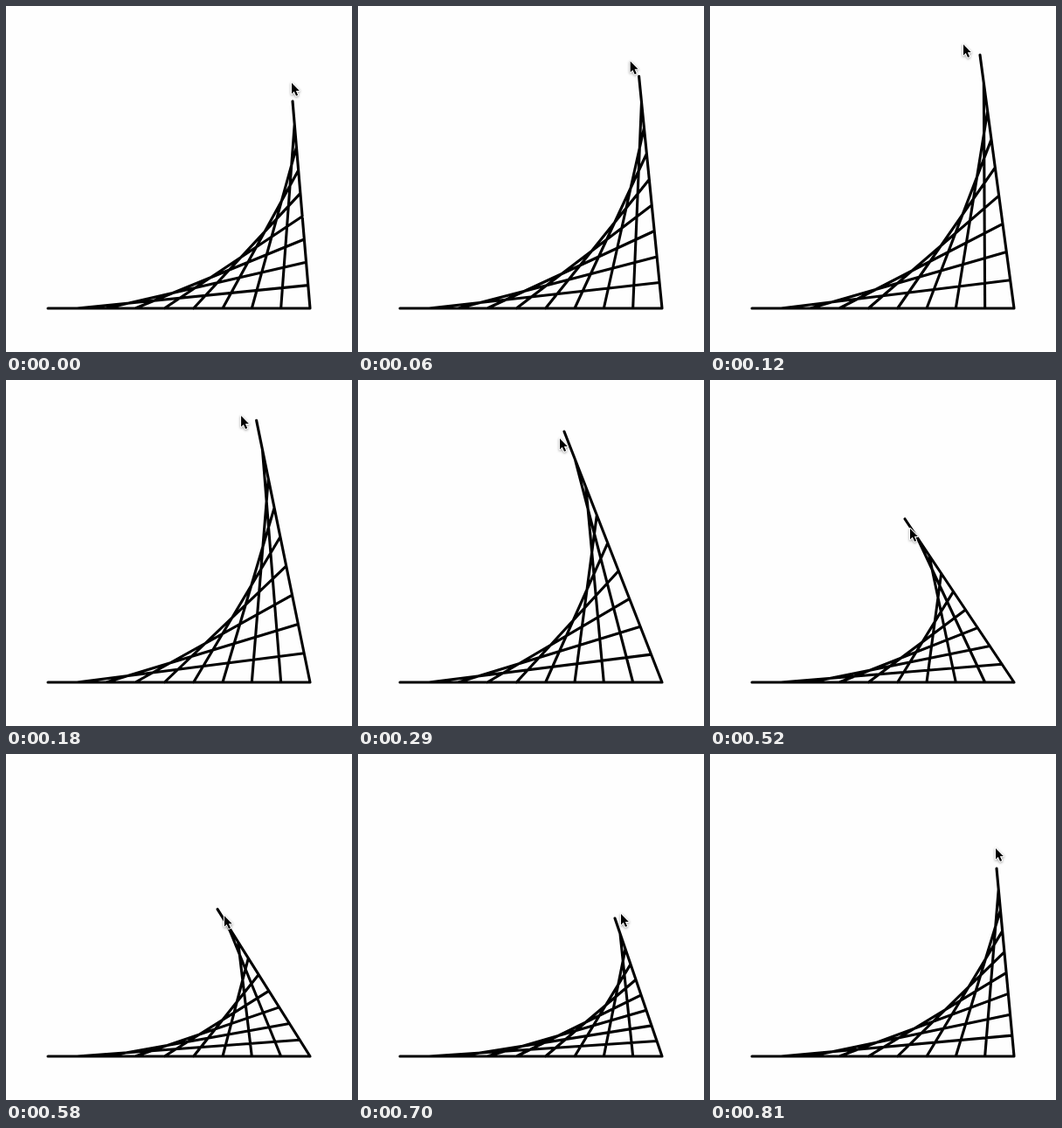
These frames come from a looping animation (396 by 396 pixels, 870 ms). An HTML page with a canvas:

```html
<!DOCTYPE html>
<html>
<head>
<meta charset="utf-8">
<style>
  html, body { margin: 0; width: 100%; height: 100%; overflow: hidden; background: #fefefe; }
  canvas { display: block; }
</style>
</head>
<body>
<canvas id="stage" width="396" height="396"></canvas>
<script>
const ctx = document.getElementById('stage').getContext('2d');
const STEPS = 15, STEP_MS = 58;
const STRINGS = 9;
const LEFT = [48, 346], CORNER = [348, 346];
const ARROW = new Path2D('M0 0V12.4L2.8 9.8L5 14.8L7.1 13.9L4.9 9H8.8Z');

// Key points of the closed drag path: step, arm end, pointer tip
const KEYS = [
  { step: 0, at: [328, 109, 327, 88] },
  { step: 2, at: [309, 56, 290, 44] },
  { step: 5, at: [236, 59, 231, 67] },
  { step: 7, at: [217, 111, 215, 122] },
  { step: 9, at: [223, 159, 229, 170] },
  { step: 12, at: [294, 188, 301, 183] },
  { step: 14, at: [328, 131, 327, 108] }
];

const mix = (a, b, k) => a.map((v, i) => v + (b[i] - v) * k);

// Key by index, wrapping round the loop in both directions
function key(i) {
  const n = KEYS.length, lap = Math.floor(i / n);
  const { step, at } = KEYS[i - lap * n];
  return { step: step + lap * STEPS, at };
}

function slope(i) {
  const [a, b, c] = [key(i - 1), key(i), key(i + 1)];
  const before = b.step - a.step, after = c.step - b.step;
  return b.at.map((v, d) =>
    ((v - a.at[d]) / before * after + (c.at[d] - v) / after * before) / (before + after));
}

// Smooth curve through the keys
function pose(step) {
  const i = KEYS.findLastIndex(k => k.step <= step);
  const a = key(i), b = key(i + 1), sa = slope(i), sb = slope(i + 1);
  const span = b.step - a.step, u = (step - a.step) / span, w = 1 - u;
  return a.at.map((v, d) =>
    v * w * w * (1 + 2 * u) + b.at[d] * u * u * (1 + 2 * w) +
    span * u * w * (sa[d] * w - sb[d] * u));
}

function drawStrings(end) {
  ctx.beginPath();
  for (let i = 0; i <= STRINGS; i++) {
    ctx.moveTo(...mix(LEFT, CORNER, i / STRINGS));
    ctx.lineTo(...mix(CORNER, end, i / STRINGS));
  }
  ctx.strokeStyle = '#000';
  ctx.lineWidth = 3.1;
  ctx.lineCap = 'round';
  ctx.stroke();
}

function drawPointer(x, y) {
  ctx.save();
  ctx.translate(x, y);
  ctx.lineJoin = 'round';
  ctx.lineWidth = 2;
  ctx.strokeStyle = '#fff';
  ctx.shadowColor = 'rgba(0, 0, 0, .4)';
  ctx.shadowBlur = 3;
  ctx.shadowOffsetY = 1;
  ctx.stroke(ARROW);
  ctx.shadowColor = 'transparent';
  ctx.fillStyle = '#000';
  ctx.fill(ARROW);
  ctx.restore();
}

function draw() {
  const time = performance.now() % (STEPS * STEP_MS);
  const step = Math.floor((time + 3) / STEP_MS) % STEPS;
  const [endX, endY, x, y] = pose(step);
  ctx.fillStyle = '#fefefe';
  ctx.fillRect(0, 0, 396, 396);
  drawStrings([endX, endY]);
  drawPointer(x, y);
  requestAnimationFrame(draw);
}
draw();
</script>
</body>
</html>
```
